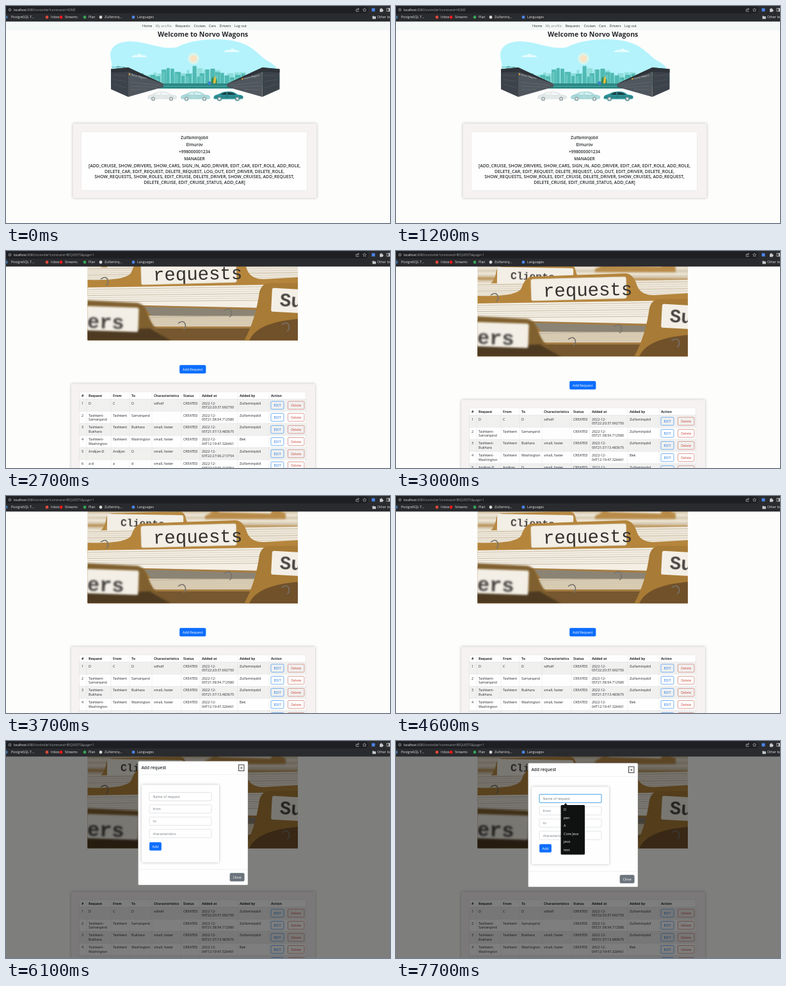
An HTML page that plays this animation: 600 px wide and 339 px high, repeating every 8 s.

```html
<!DOCTYPE html>
<html lang="en">
<head>
<meta charset="utf-8">
<title>Request form demo</title>
<style>
  html, body { margin: 0; width: 100%; height: 100%; overflow: hidden; background: #fdfdfc; }
  svg { display: block; width: 600px; height: 339px; font-family: "Open Sans", "Noto Sans", sans-serif; }
  text { white-space: pre; }
  .type { font-family: "Liberation Mono", monospace; }
  .soft { filter: blur(.7px); }
  .far { filter: blur(1.4px); }
  .shade { filter: blur(2px); }
</style>
</head>
<body>
<svg id="stage" viewBox="0 0 600 339"></svg>
<script>
const LOOP = 8000, STEP = 100;
const USER = 'Zulfamirqobil', BRAND = 'Norvo Wagons';
const INK = '#26292c', BLUE = '#0d6efd';

// y is the middle of the capitals
const text = (x, y, str, size = 5.4, fill = INK, more = '') =>
  `<text x="${x}" y="${(y + size * .36).toFixed(2)}" font-size="${size}" fill="${fill}" ${more}>${str}</text>`;
const rect = (x, y, w, h, fill, more = '') =>
  `<rect x="${x}" y="${y}" width="${w}" height="${h}" fill="${fill}" ${more}/>`;
const path = (d, fill, more = '') => `<path d="${d}" fill="${fill}" ${more}/>`;
const line = (d, stroke, width = .5) => path(d, 'none', `stroke="${stroke}" stroke-width="${width}"`);
const dot = (x, y, r, fill, more = '') => `<circle cx="${x}" cy="${y}" r="${r}" fill="${fill}" ${more}/>`;
const group = (body, more = '') => `<g ${more}>${body}</g>`;
const shift = (x, y, flip = 1) => `matrix(${flip} 0 0 1 ${x} ${y})`;
const BOLD = 'font-weight="700"', SEMI = 'font-weight="600"', MID = 'text-anchor="middle" ';

const card = (x, y, w, h, fill) =>
  rect(x, y, w, h, '#000', 'class="shade" opacity=".26"') + rect(x, y, w, h, fill);

const button = (x, y, w, h, label, fill, color, stroke = fill) =>
  rect(x, y, w, h, fill, `rx="1.6" stroke="${stroke}" stroke-width=".7"`) +
  text(x + w / 2, y + h / 2, label, 5.3, color, MID);

function nav(dx) {
  const links = [['Home', 213], ['My profile', 233.5], ['Requests', 264.5], ['Cruises', 293.5],
    ['Cars', 317], ['Drivers', 333.5], ['Log out', 357]];
  return rect(0, 24, 600, 14, '#f4f8f7') +
    links.map(([s, x], i) => text(x + dx, 31, s, 5.4, i === 1 ? '#85898c' : INK)).join('');
}

function toolbar() {
  const marks = [['PostgreSQL T…', 8, '#3f6f9e'], ['Inbox', 70, '#e0493c'], ['Streams', 92, '#f01818'],
    ['Plan', 129, '#35a558'], [USER.slice(0, 9) + '...', 154, '#d8d8d8'], ['Languages', 205, '#4a86ee']];
  const grey = '#c6c8ca';
  return rect(0, 0, 600, 24.3, '#2a2b2e') +
    rect(-10, .6, 576, 11, '#1e1f22', 'rx="5.5"') +
    dot(6, 6, 2, 'none', `stroke="${grey}" stroke-width=".6"`) + line('M6 5.6V7.2M6 4.6V5.1', grey, .6) +
    '<text id="url" x="12" y="7.8" font-size="4.75" fill="#9fa2a6"></text>' +
    line('M550 5h-3v3.6h4v-1.4M548.6 7q0-2.6 2.8-2.6M550 3l1.6 1.4-1.6 1.4', grey, .6) +
    line('M560.2 3.2l.8 1.9 2 .2-1.5 1.3.5 2-1.8-1.1-1.8 1.1.5-2-1.5-1.3 2-.2z', grey, .55) +
    rect(571.5, 3.5, 5, 5, '#4a86ee') +
    path('M584 4.5h1.4q0-1.3 1-1.3t1 1.3h1.3v1.4q1.2 0 1.2 1t-1.2 1v1.3H584z', grey) +
    rect(595, 3.5, 4.6, 4.8, 'none', `stroke="${grey}" stroke-width=".7"`) + rect(597.6, 3.5, 2, 4.8, grey) +
    marks.map(([s, x, c], i) => dot(i ? x - 6 : .5, 17.5, 2.4, c) + text(x, 17.6, s, 5.2, '#e4e5e6')).join('') +
    path('M572.5 15.4h2l.7.8h2.7v4h-5.4z', grey) + text(580, 17.6, 'Other bookmarks', 5.2, '#e4e5e6');
}

function skyline() {
  let seed = 11, out = '';
  const rnd = () => (seed = seed * 16807 % 2147483647) / 2147483647;
  for (const [base, amp, fill] of [[20, 14, '#8fdedb'], [11, 24, '#4fbab3']])
    for (let x = 190; x < 400;) {
      const w = 4 + rnd() * 6, peak = Math.exp(-(((x - 292) / 70) ** 2));
      const h = base * .6 + amp * (.25 + .75 * rnd()) * (.35 + peak * .75);
      out += rect(x.toFixed(1), (124 - h).toFixed(1), w.toFixed(1), h.toFixed(1), fill);
      if (w > 7) out += line(`M${x + 2} ${128 - h}V122M${x + 4} ${128 - h}V122`, '#a6e8e4');
      x += w + rnd() * 2;
    }
  return out;
}

const car = (x, body, glass) => group(
  path('M0 11q-.6-5 5-6 4-1 8-3.4 4-2 13-1.5 6 .4 11 4.6 8 .6 9 3 .6 2.4-.2 3.4-1 1-4 1H4q-3 0-4-1.1z', body) +
  path('M11 5q4-3.6 9-3.8v4zM21.5 1.2q8-.5 13 4l-13 .1z', glass) +
  line('M2 8.6H45M21 5V11', glass, .4) +
  [9, 37].map(c => dot(c, 11.4, 3.5, body) + dot(c, 11.4, 2.9, '#8f9a9c') + dot(c, 11.4, 1.7, '#e9eeee')).join(''),
  `transform="${shift(x, 133.5)}"`);

const hall = () =>
  path('M164 98.5L191 96V142L164 130z', '#3d434a') +
  path('M191 96L246 121.5V126.5L191 142z', '#50565d') +
  path('M164 98.5L191 96L246 121.5L191 103L164 104z', '#2f343a') +
  line('M195 119L240 124M195 125L236 127M195 131L220 130', '#6b7279', .6) +
  line('M168 108L188 109M168 115L188 118M168 122L188 128', '#565d65', .6);

function home() {
  const blob = 'M164 84C158 60 182 53 204 56C232 60 248 69 268 64C292 51 336 49 362 56C390 64 394 78 411 87C430 97 431 116 424 129H166C160 116 168 98 164 84z';
  const rights = ['[ADD_CRUISE, SHOW_DRIVERS, SHOW_CARS, SIGN_IN, ADD_DRIVER, EDIT_CAR, EDIT_ROLE, ADD_ROLE,',
    'DELETE_CAR, EDIT_REQUEST, DELETE_REQUEST, LOG_OUT, EDIT_DRIVER, DELETE_ROLE,',
    'SHOW_REQUESTS, SHOW_ROLES, EDIT_CRUISE, DELETE_DRIVER, SHOW_CRUISES, ADD_REQUEST,',
    'DELETE_CRUISE, EDIT_CRUISE_STATUS, ADD_CAR]'];
  const sign = (x, y, a) => group(dot(-1.6, 0, 1.3, '#d8a13a') + text(1, 0, BRAND, 3.6, '#d9dcde'),
    `transform="${shift(x, y)} rotate(${a})"`);
  return nav(0) + text(237, 44, 'Welcome to ' + BRAND, 10.6, INK, BOLD) +
    path(blob, '#b4f3fc') +
    dot(293, 82, 9, '#fdf3d6', 'opacity=".55"') + dot(293, 82, 5, '#fbe2c2') +
    path('M196 80q3-5 8-3 4-5 9 0 6-1 7 3zM340 72q4-5 9-3 5-5 10 0 5 0 6 3z', '#e6fcff') +
    skyline() +
    path('M240 121H350L356 129H236z', '#2c8884') + line('M236 125.5H356', '#6fc6c0') +
    line('M174 99V94M165 95.5H186M174 94L180 95.5M183 95.5V99', '#3f9b98', .7) +
    path('M321 121q-1-6 2-11 3 5 1 11zM327 121q-1-5 1.5-8 2 4 1 8z', '#3d8a4d') +
    path('M324 121q0-8 3-12 2 6 0 12z', '#e8bf3f') + dot(318, 120.5, 2.8, '#3a83cc') +
    hall() + sign(194.5, 107, 13) +
    group(hall(), `transform="${shift(591.5, 0, -1)}"`) + sign(371, 113.5, -13) +
    car(221, '#dfe5e5', '#f4f7f7') + car(273, '#a4d5d6', '#d7f0f0') + car(324.5, '#2c9297', '#1d3f45') +
    card(104.5, 183.5, 381, 116.5, '#f5f2f1') +
    rect(117.5, 196.5, 353, 91.5, '#fefefe', 'stroke="#e3e1e0" stroke-width=".5"') +
    [USER, 'Elmurov', '+998000001234', 'MANAGER'].map((s, i) => text(294.5, 206 + i * 11, s, 6.6, INK, MID + SEMI)).join('') +
    rights.map((s, i) => text(294.5, 250 + i * 8.35, s, 6.85, INK, MID + SEMI)).join('');
}

function photo() {
  let papers = '';
  for (let i = 0; i < 9; i++) {
    papers += path(`M127 ${42 + i * 8}L456 ${37 + i * 9}v3.5L127 ${46 + i * 8}z`, i % 3 === 1 ? '#b98f52' : '#f0e9da');
  }
  const tab = (x, y, w, h, fill, rise = 3) =>
    path(`M${x - 18} ${y + h}Q${x - 5} ${y + h - 4} ${x - 2} ${y + 6}Q${x} ${y} ${x + 7} ${y}L${x + w - 7} ${y - rise}Q${x + w} ${y - rise} ${x + w + 3} ${y + 4}Q${x + w + 7} ${y + h - 8} ${x + w + 20} ${y + h - 4}V${y + h + 5}H${x - 18}z`, fill);
  const label = (x, y, w, h, a, more = '') =>
    rect(x, y, w, h, '#f3efe6', `rx="3" transform="rotate(${a} ${x + w / 2} ${y + h / 2})" ${more}`);
  const word = (x, y, s, size, a, fill, cls) =>
    text(x, y, s, size, fill, `class="type ${cls}" transform="rotate(${a} ${x} ${y})" font-weight="700"`);
  const ring = (x, y) => path(`M${x - 6} ${y - 5}q8-6 11 1 2 7-3 9`, 'none', 'stroke="#77726a" stroke-width="1.6" class="soft"');
  const sheets = (y, n) => Array.from({ length: n }, (_, i) =>
    line(`M127 ${y + i * 3.2}L456 ${y - 5 + i * 3.6}`, i % 3 ? '#cfc6b4' : '#b3a58c', .7)).join('');
  return group(
    rect(127, 38, 329, 184, '#d8ccb5') + group(papers, 'class="far"') +
    group(tab(243, 50, 80, 22, '#b98d4c') + label(249, 53, 72, 12, -2) +
      tab(329, 61, 88, 24, '#b88b49') + label(331, 62, 84, 18, 2) + label(127, 44, 48, 13, 2) +
      line('M260 59l44-2', '#8d877d', 3) + line('M345 71l54 1', '#8d877d', 3.5), 'class="far"') +
    group(tab(159, 81, 118, 31, '#b78942') + label(158, 83, 119, 27, 1), 'class="soft"') +
    word(179, 95, 'Clients', 16.4, 2, '#4b4844', 'soft') +
    path('M127 108L456 102V150H127z', '#efe8da') + sheets(110, 6) +
    path('M127 127Q190 129 196 115Q202 97 213 97L358 92Q371 92 377 112Q383 126 403 126L456 123V145L127 151z', '#b5853c') +
    path('M127 139L456 134V174L127 170z', '#f4efe5') + sheets(142, 7) +
    label(211, 99, 149, 34, -1.5, 'stroke="#d0c2a4" stroke-width=".8"') +
    text(230, 118, 'requests', 29, '#34312e', 'class="type" transform="rotate(-1.2 230 118)"') +
    path('M127 165L456 172V222H127z', '#a67d43') +
    path('M215 169L456 176V187L228 184z', '#8b8475') +
    path('M222 183L456 184V200L230 200z', '#d8cbb2') + sheets(187, 3) +
    path('M127 203H456V222H127z', '#76572f') +
    group(path('M372 222Q390 190 396 146Q400 132 412 132H458V222z', '#a87b36') +
      path('M380 222Q392 193 458 188V222z', '#71512a') + label(415, 141, 52, 37, 3), 'class="soft"') +
    word(428, 158, 'Su', 29, 4, '#4a4643', 'soft') +
    group(path('M125 159L205 163Q217 165 222 182Q228 204 258 222H125z', '#80602f') +
      path('M125 206L225 203L258 222H125z', '#4d3a21') + label(110, 169, 97, 38, 2), 'class="far"') +
    word(127, 190, 'ers', 32, 2, '#45423f', 'far') +
    ring(154, 131) + ring(347, 180) + ring(275, 200) + ring(437, 202),
    'clip-path="url(#frame)"');
}

function table() {
  const cols = [118, 129, 167, 196, 231, 277, 306, 365, 414];
  const heads = ['#', 'Request', 'From', 'To', 'Characteristics', 'Status', 'Added at', 'Added by', 'Action'];
  const rows = [
    ['D', 'C', 'D', 'sdfsdf', '05T22:20:37.692750'],
    ['Tashkent-|Samarqand', 'Tashkent', 'Samarqand', '', '05T21:38:54.712580'],
    ['Tashkent-|Bukhara', 'Tashkent', 'Bukhara', 'small, faster', '05T21:37:13.483675'],
    ['Tashkent-|Washington', 'Tashkent', 'Washington', 'small, faster', '04T12:19:47.326461'],
    ['Andijan-D', 'Andijan', 'D', 'small, faster', '03T22:27:06.213754'],
    ['a-d', 'a', 'd', 'small, faster', '03T22:27:06.213754']];
  const edge = '#dcdddd';
  let out = rect(114.5, 302, 354, 160, '#fefefe') + heads.map((s, i) => text(cols[i], 308, s, 5.25, INK, BOLD)).join('');
  rows.forEach(([name, from, to, kind, at], i) => {
    const y = 313.5 + i * 18.9;
    if (i % 2 === 0) out += rect(114.5, y, 354, 18.9, '#f0f0ef');
    out += line(`M114.5 ${y}H468.5`, edge);
    const cells = [i + 1 + '', name, from, to, kind, 'CREATED', '2022-12-|' + at, i === 3 ? 'Bek' : USER];
    cells.forEach((c, j) => c.split('|').forEach((s, k) => { out += text(cols[j], y + 6.2 + k * 6.5, s, 5.35); }));
    out += button(414, y + 3.3, 20, 12.4, 'EDIT', 'none', '#1673e6', '#3b93f0') +
      button(440.5, y + 3.3, 25.5, 12.4, 'Delete', 'none', '#cf4a3c', '#d0796c');
  });
  return out + line('M114.5 302H468.5M114.5 302V460M468.5 302V460', edge) +
    cols.slice(1).map(x => line(`M${x - 3} 302V460`, edge, .35)).join('');
}

const requests = () => nav(-2.5) + photo() +
  button(271.5, 260.5, 40.5, 12.5, 'Add Request', BLUE, '#fff') +
  card(102, 289.5, 381, 200, '#f5f2f1') + table();

function modal() {
  const fields = ['Name of request', 'from', 'to', 'characteristics'];
  const hints = ['D', 'pen', 'A', 'Core Java', 'java', 'test'];
  return rect(206.5, 34.5, 171.5, 193.5, '#fefefe', 'rx="1.6" stroke="#8c8c8c" stroke-width=".4"') +
    text(211.5, 44.6, 'Add request', 6.6, INK, SEMI) +
    rect(363.6, 40, 8.4, 9.6, '#efefef', 'stroke="#333" stroke-width=".9"') +
    text(367.8, 44.8, '×', 5.4, '#111', MID + BOLD) +
    line('M206.5 55.5H378M206.5 203.5H378', '#dee2e6') +
    card(212, 71.5, 121, 121, '#fefefe') +
    fields.map((s, i) => {
      const y = 83.4 + i * 19.2;
      return rect(224, y, 97, 13, '#fff', 'rx="1.4" stroke="#cdd2d7" stroke-width=".6"') + text(229.5, y + 6.6, s, 5.4, '#73797f');
    }).join('') +
    rect(224, 83.4, 97, 13, 'none', 'id="glow" rx="1.4" stroke="#6cb8ee" stroke-width="1.2"') +
    button(224.4, 161.4, 18.2, 12.4, 'Add', BLUE, '#fff') +
    button(350, 209.5, 22.2, 12.4, 'Close', '#6c757d', '#fff') +
    group(path('M262 100.5L265 97L268 100.5z', '#101211') + rect(257.5, 100, 37.5, 77.5, '#101211', 'rx="1.6"') +
      hints.map((s, i) => text(262, 107.4 + i * 12.5, s, 5.4, '#f1f1f1')).join(''), 'id="hints"');
}

const stage = document.getElementById('stage');
stage.innerHTML = '<defs><clipPath id="frame"><rect x="127.5" y="38" width="328.5" height="183.5"/></clipPath></defs>' +
  rect(0, 0, 600, 339, '#fdfdfc') + group(home(), 'id="home"') + group(requests(), 'id="list"') +
  rect(0, 24, 600, 315, '#000', 'id="dim"') + group(modal(), 'id="modal"') + toolbar();
const part = Object.fromEntries(['home', 'list', 'dim', 'modal', 'glow', 'hints', 'url']
  .map(id => [id, document.getElementById(id)]));

const SCROLL = [20, 50, 77, 90, 82, 71, 63, 57, 54];
const ramp = (t, from, to) => Math.min(1, Math.max(0, (t - from) / (to - from)));
const smooth = p => p * p * (3 - 2 * p);
const easeOut = p => 1 - (1 - p) ** 1.7;
let shownUrl = '';

function draw(now) {
  const t = Math.floor(now % LOOP / STEP) * STEP;
  const onList = t >= 1500;
  const step = Math.min(SCROLL.length - 1, (t - 2300) / STEP);
  part.home.style.display = onList ? 'none' : '';
  part.list.style.display = onList ? '' : 'none';
  part.list.setAttribute('transform', shift(0, step < 0 ? 0 : -SCROLL[step]));
  part.dim.setAttribute('opacity', ramp(t, 5150, 5600) * .5);
  part.modal.setAttribute('opacity', ramp(t, 5600, 6000));
  part.modal.setAttribute('transform', shift(0, -15.6 * (1 - easeOut(ramp(t, 5600, 6400)))));
  part.glow.setAttribute('opacity', smooth(ramp(t, 6500, 7000)));
  part.hints.setAttribute('opacity', ramp(t, 7000, 7300));
  const url = onList ? 'REQUESTS&amp;page=1' : 'HOME';
  if (url !== shownUrl) {
    part.url.innerHTML = `<tspan fill="#f0f1f2">localhost</tspan>:8080/controller?command=${url}`;
    shownUrl = url;
  }
}

const start = performance.now();
function tick() {
  draw(performance.now() - start);
  requestAnimationFrame(tick);
}
tick();
</script>
</body>
</html>
```
